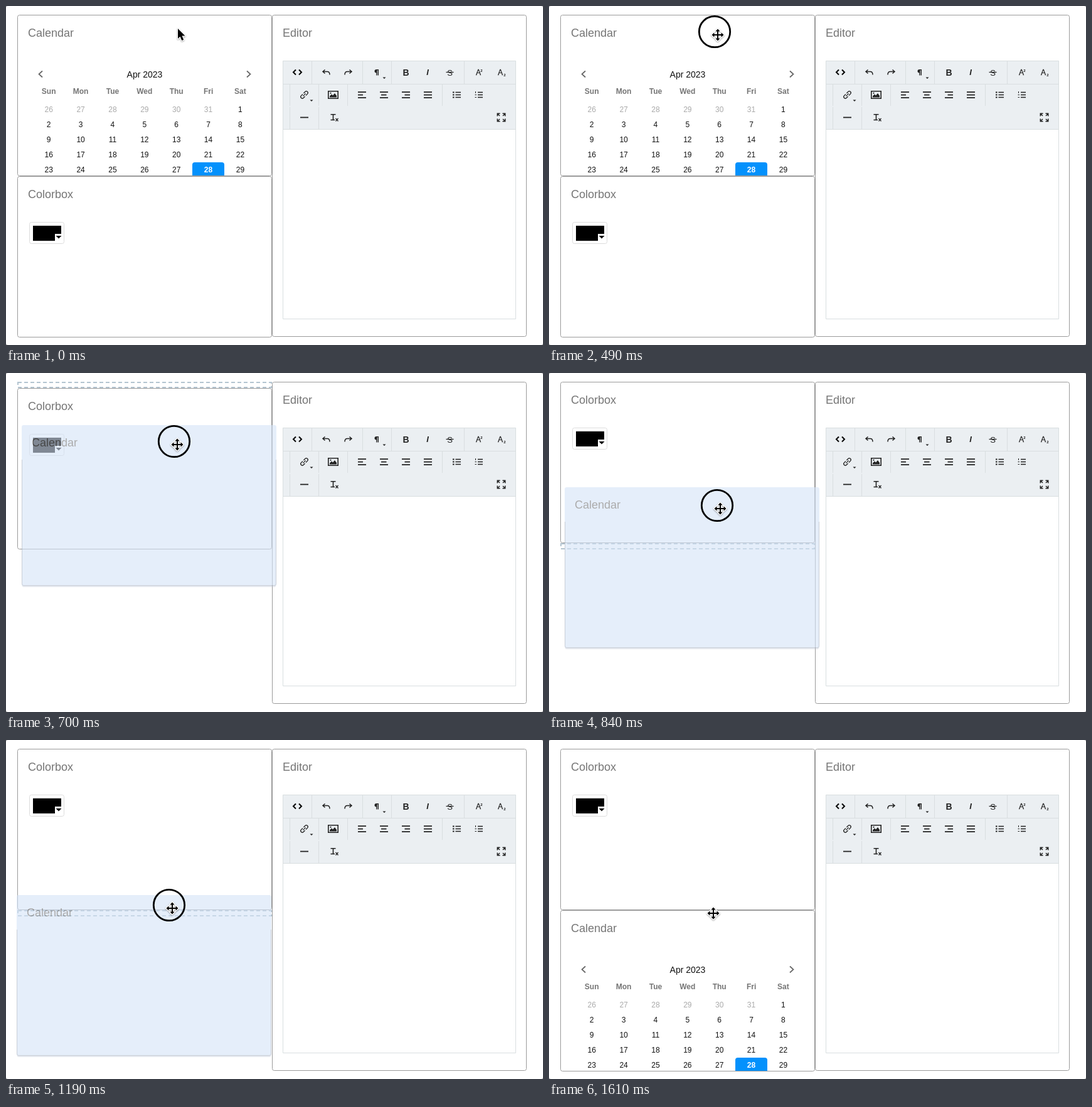
An HTML page for the animation above (2380 ms loop, 856x540 px).

```html
<!DOCTYPE html>
<html lang="en">
<head>
<meta charset="utf-8">
<title>Dashboard drag and drop</title>
<style>
  html, body { margin: 0; width: 856px; height: 540px; overflow: hidden; background: #999; }
  svg { display: block; }
  text { font-family: "Liberation Sans", Arial, sans-serif; font-size: 12px; fill: #111; }
  .title { font-size: 18px; fill: #757575; }
  .mid text { text-anchor: middle; }
  .days text { font-weight: bold; fill: #757575; }
  .panel { fill: #fff; stroke: #9b9b9b; }
  .line { fill: none; stroke: #d9dee0; }
  .icons path { fill: none; stroke: #222; }
  .icons .solid { fill: #222; stroke: none; }
  .icons text { fill: #222; font-size: 14px; }
</style>
</head>
<body>
<svg id="stage" width="856" height="540">
  <rect width="856" height="540" rx="3" fill="#fff"/>

  <g id="colorbox">
    <rect class="panel" x="18.5" y="14.5" width="405" height="256" rx="3"/>
    <text class="title" x="35" y="49">Colorbox</text>
    <rect x="37.5" y="87.5" width="55" height="34" rx="3" fill="#fff" stroke="#dcdcdc"/>
    <path d="M43 93H88V106H78V117H43Z"/>
    <path d="M79.5 109H88.500L84 113.500Z"/>
  </g>

  <g id="calendar">
    <rect class="panel" x="18.5" y="14.500" width="405" height="256" rx="3"/>
    <text class="title" x="35" y="49">Calendar</text>
    <path d="M58 103.500L52.500 108.500L58 113.500M384 103.500L389.500 108.500L384 113.500" fill="none" stroke="#666" stroke-width="1.700"/>
    <g class="mid">
      <text x="221" y="114" style="font-size:14px">Apr 2023</text>
      <g class="days" id="days"></g>
      <path d="M297 270V253Q297 249 301 249H344Q348 249 348 253V270Z" fill="#0491fc"/>
      <g id="dates"></g>
    </g>
  </g>

  <rect class="panel" x="424.5" y="14.5" width="405" height="512" rx="3"/>
  <text class="title" x="441" y="49">Editor</text>
  <path fill="#ebeff2" d="M441 87H813V197H441Z"/>
  <path class="line" d="M441.500 87.500H812.500V498.500H441.500ZM441 196.500H813M441 124.500H813
    M487.500 88V124M568.500 88V124M614.500 88V124M730.500 88V124
    M452.500 125V159M498.500 125V159M544.500 125V159M695.500 125V159M452.500 161V196M498.500 161V196"/>
  <g class="icons mid">
    <path stroke-width="2" style="stroke:#000" d="M462 101.500L458 105.500L462 109.500M467 101.500L471 105.500L467 109.500"/>
    <g id="undo">
      <path stroke-width="1.500" d="M508.500 101.500L505 104.500L508.500 107.500M505 104.500H512Q516 104.500 516 109.500"/>
    </g>
    <use href="#undo" transform="matrix(-1 0 0 1 1056 0)"/>
    <path class="solid" d="M594 101V110.500H592.600V102.200H591.600V110.500H590.200V106.500Q587.500 106.300 587.500 103.700Q587.500 101 590.500 101Z"/>
    <path class="solid" d="M600.500 113.500H605.500L603 116ZM484.500 149.500H489.500L487 152Z"/>
    <text x="637.500" y="110.500" font-weight="bold">B</text>
    <text x="672" y="110" font-weight="bold" font-style="italic" style="font-size:13px">I</text>
    <text x="707.500" y="110.500" style="font-size:13px">S</text>
    <path stroke-width="1.300" d="M701.500 105.500H713.500"/>
    <text x="753" y="110" style="font-size:12px" stroke="#222" stroke-width=".3">A</text>
    <text x="758" y="104.500" style="font-size:6px" font-weight="bold">2</text>
    <text x="788" y="110" style="font-size:12px" stroke="#222" stroke-width=".3">A</text>
    <text x="795" y="112" style="font-size:6px" font-weight="bold">2</text>

    <g transform="translate(475.500 141.500) rotate(-45)">
      <path stroke-width="1.300" d="M-1 -2.500H-4.500A2.500 2.500 0 0 0 -4.500 2.500H-1M1 -2.500H4.500A2.500 2.500 0 0 1 4.500 2.500H1M-3 0H3"/>
    </g>
    <path stroke-width="1.600" d="M513.800 135.800H529.200V147.200H513.800Z"/>
    <path class="solid" d="M516 145.500V143.500L519 140.500L521 142.500L524 139L527 143V145.500Z"/>
    <circle cx="517.500" cy="138.700" r="1"/>
    <g id="aligns"></g>
    <path stroke-width="2" d="M712 137.500H714.500M712 141.500H714.500M712 145.500H714.500"/>
    <path stroke-width="1.700" d="M716.500 137.500H725M716.500 141.500H725M716.500 145.500H725"/>
    <path stroke-width="1.300" d="M752 137.500H760M752 141.500H760M752 145.500H760"/>
    <path stroke-width="1" d="M748.500 136V139M747.500 141.500H750M747.500 145.500H750"/>

    <path stroke-width="1.800" d="M469 177.500H482"/>
    <path stroke-width="1.600" d="M517.500 172.800H525.500M521.500 173V181.500M517.500 181.500H524"/>
    <path stroke-width="1.300" d="M525.500 179L529.500 183.500M529.500 179L525.500 183.500"/>
    <g id="corners" transform="translate(789.500 177.500)"></g>
  </g>

  <rect id="slot" x="19" y="15" width="404" height="8" fill="none" stroke="#b4c5d1" stroke-width="2" stroke-dasharray="6 4"/>

  <g id="ghost" opacity=".6">
    <rect x="18.5" y="16" width="405" height="256" rx="3" fill="#b9c3d2" opacity=".6"/>
    <rect x="18" y="14" width="406" height="256" rx="3" fill="#d5e3f7"/>
    <path d="M18.500 69V267Q18.500 269.500 21 269.500H421Q423.500 269.500 423.500 267V69" fill="none" stroke="#a6afbd"/>
    <text class="title" x="34" y="48">Calendar</text>
  </g>

  <g id="pointer">
    <circle id="ring" r="24.700" fill="none" stroke="#000" stroke-width="2.800"/>
    <g style="filter:drop-shadow(0 1.500px 1px rgba(0,0,0,.35))" stroke="#fff" stroke-linejoin="round" paint-order="stroke">
      <path id="arrow" stroke-width="2.400" transform="translate(5 5)" d="M0 0V16L3.600 12.700L6.300 19L9.200 17.800L6.500 11.500H11.500Z"/>
      <path id="move" stroke-width="2.600" transform="translate(5 5)"/>
    </g>
  </g>
</svg>
<script>
const $ = id => document.getElementById(id);
const STEP = 70, LOOP = 2380;
const DRAG = 560, SWAP = 770, DROP = 1610;

// Calendar cells: seven columns, five rows, starting on 26 March
const columnX = i => 68.2 + 50.87 * i;
$("days").innerHTML = ["Sun", "Mon", "Tue", "Wed", "Thu", "Fri", "Sat"]
  .map((day, i) => `<text x="${columnX(i)}" y="140">${day}</text>`).join("");
$("dates").innerHTML = Array.from({ length: 35 }, (_, i) => {
  const day = i < 6 ? 26 + i : i - 5;
  const fill = i < 6 ? "#aaa" : day === 28 ? "#fff" : "#111";
  const weight = fill === "#fff" ? "bold" : "normal";
  return `<text x="${columnX(i % 7)}" y="${169 + 24 * Math.floor(i / 7)}" style="fill:${fill};font-weight:${weight}">${day}</text>`;
}).join("");

// Alignment icons: the middle line differs
$("aligns").innerHTML = [[561, 569], [598, 606.5], [635.5, 644], [666, 679]].map(([from, to], i) => {
  const left = 561 + 35 * i;
  return `<path stroke-width="1.800" d="M${left} 137.200H${left + 13}M${from} 141.700H${to}M${left} 146.200H${left + 13}"/>`;
}).join("");

const turns = (angles, shape) => angles.map(a => `<g transform="rotate(${a})">${shape}</g>`).join("");
$("corners").innerHTML = turns([0, 90, 180, 270],
  '<path stroke-width="1.500" d="M-6.200 -2V-6.200H-2M-6 -6L-2.500 -2.500"/>');

// Four-way cursor: one arm turned by quarter circles
const arm = [[-1, -1], [-1, -5.5], [-3.7, -5.5], [0, -9.5], [3.7, -5.5], [1, -5.5]];
const outline = [0, 1, 2, 3].flatMap(q => arm.map(([x, y]) => {
  for (let i = 0; i < q; i++) [x, y] = [-y, x];
  return `${x} ${y}`;
}));
$("move").setAttribute("d", `M${outline.join("L")}Z`);

// Rows: time, pointer x, pointer y
const pointerKeys = [
  [0, 269, 31], [210, 262, 28], [420, 262, 28], [490, 264, 41], [560, 266, 57],
  [630, 267, 80], [700, 268, 109], [840, 268, 211], [910, 264, 240], [980, 261, 258],
  [1190, 260, 263], [1470, 258, 271], [1540, 257.5, 271], [1610, 257, 271]
];
// Rows: time, top of the dragged card, which trails the pointer
const ghostKeys = [
  [560, 36], [630, 57], [700, 83], [770, 131], [840, 182],
  [910, 219], [980, 238], [1190, 247], [1470, 256], [1540, 256]
];

function at(keys, t) {
  const next = keys.findIndex(key => key[0] > t);
  if (next < 0) return keys[keys.length - 1].slice(1);
  if (next === 0) return keys[0].slice(1);
  const a = keys[next - 1], b = keys[next];
  const k = (t - a[0]) / (b[0] - a[0]);
  return a.slice(1).map((v, i) => v + (b[i + 1] - v) * k);
}
const place = (id, x, y) => $(id).setAttribute("transform", `translate(${x} ${y})`);
const show = (id, on) => $(id).style.display = on ? "" : "none";

function draw(now) {
  const t = Math.floor(now % LOOP / STEP) * STEP;
  const dragging = t >= DRAG && t < DROP;
  const [x, y] = at(pointerKeys, t);
  const [top] = at(ghostKeys, t);

  place("pointer", Math.round(x), Math.round(y));
  show("ring", t >= 350 && t < DROP);
  show("arrow", t < STEP);
  show("move", t >= STEP);

  show("calendar", !dragging);
  place("calendar", 0, t < DROP ? 0 : 257);
  place("colorbox", 0, t < DRAG ? 257 : t < SWAP ? 10 : 0);
  show("slot", dragging);
  place("slot", 0, t < SWAP ? 0 : 257);
  show("ghost", dragging);
  place("ghost", Math.round(x) - 261, Math.round(top) - 14);
}

const start = performance.now();
function tick() {
  draw(performance.now() - start);
  requestAnimationFrame(tick);
}
draw(0);
requestAnimationFrame(tick);
</script>
</body>
</html>
```
